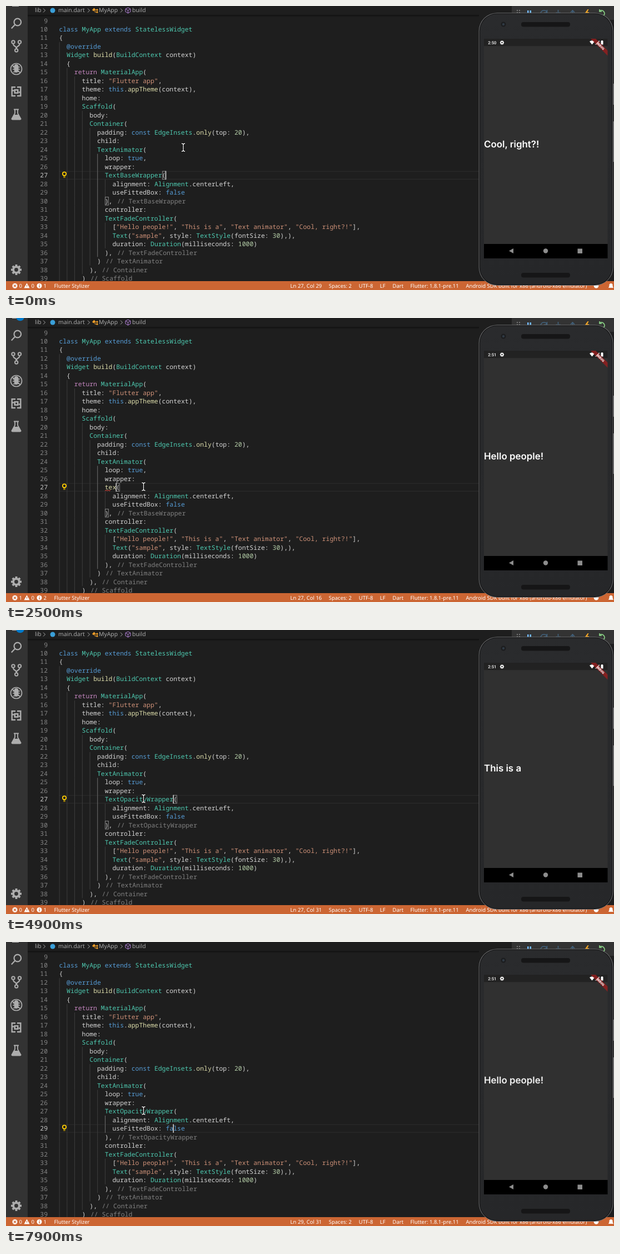
Write an HTML page with a canvas that moves like this. It is 1094 px wide and 512 px high and loops after 8 s.

```html
<!DOCTYPE html>
<html lang="en">
<head>
<meta charset="utf-8">
<title>Editor and emulator</title>
<style>
html, body { margin: 0; width: 100%; height: 100%; overflow: hidden; background: #1e1e1e; }
canvas { display: block; }
</style>
</head>
<body>
<canvas id="stage" width="1094" height="512"></canvas>
<script>
const c = document.getElementById('stage').getContext('2d');
const LOOP = 8000;
const X0 = 95.4, CH = 6.86, LH = 15.483;
const MONO = '11.43px "Noto Sans Mono", monospace';
const BOLD = 'bold ' + MONO;
const CRUMB = '10.4px "Noto Sans", sans-serif';
const STATUS = '9.5px "Noto Sans", sans-serif';
const BLUE = '#569cd6', TEAL = '#4ec9b0', PLAIN = '#d4d4d4', GREY = '#858585', ICON = '#adadad';

const code = `
class MyApp extends StatelessWidget
{
  @override
  Widget build(BuildContext context)
  {
    return MaterialApp(
      title: "Flutter app",
      theme: this.appTheme(context),
      home:
      Scaffold(
        body:
        Container(
          padding: const EdgeInsets.only(top: 20),
          child:
          TextAnimator(
            loop: true,
            wrapper:
            @word(
              alignment: Alignment.centerLeft,
              useFittedBox: false
            ), // @label
            controller:
            TextFadeController(
              ["Hello people!", "This is a", "Text animator", "Cool, right?!"],
              Text("sample", style: TextStyle(fontSize: 30),),
              duration: Duration(milliseconds: 1000)
            ), // TextFadeController
          ) // TextAnimator
        ), // Container
      ) // Scaffold`.split('\n');

// icon kind, then the label with matched letters in brackets
const hints = [
  'c[TextOpa]cityWrapper', 'm[TextOpa]cityWrapper(…)', 'm[Text]Range.c[o]ll[ap]sed(…)',
  'm[Text]InputF[o]rmatFunction(…)', 'c[Text]In[p]utF[o]rm[a]tter', 'm[Text]InputFormatter()',
  'm[Text]Selecti[o]n.coll[ap]sed(…)', 'e[Text]Baseline.ide[o]gr[ap]hic',
  'c[Text]In[p]utC[o]nfigur[a]tion', 'm[Text]InputConfiguration(…)',
  'e[Text]In[p]utActi[o]n.se[a]rch', 'e[Text]In[p]utActi[o]n.continue[A]ction'
];

const midY = n => 42 + (n - 10) * LH;
const colX = n => X0 + n * CH;
const within = (t, a, b) => t >= a && t < b;

// last value whose start time has passed
function at(t, steps) {
  let value = steps[0][1];
  for (const [start, v] of steps) if (t >= start) value = v;
  return value;
}

function text(s, x, y, color, font, align = 'left') {
  c.font = font;
  c.fillStyle = color;
  c.textAlign = align;
  c.fillText(s, x, y);
}

function rect(x, y, w, h, color) {
  c.fillStyle = color;
  c.fillRect(x, y, w, h);
}

function round(x, y, w, h, r, color) {
  c.beginPath();
  c.roundRect(x, y, w, h, r);
  c.fillStyle = color;
  c.fill();
}

function disc(x, y, r, color) {
  c.beginPath();
  c.arc(x, y, r, 0, 7);
  c.fillStyle = color;
  c.fill();
}

function stroke(d, color, width = 1) {
  c.strokeStyle = color;
  c.lineWidth = width;
  c.stroke(new Path2D(d));
}

function fill(d, color) {
  c.fillStyle = color;
  c.fill(new Path2D(d));
}

const ring = (x, y, r) => `M${x - r} ${y}a${r} ${r} 0 1 0 ${2 * r} 0a${r} ${r} 0 1 0 ${-2 * r} 0`;

function gear(x, y, r, color, hole) {
  for (let i = 0; i < 8; i++) {
    c.save();
    c.translate(x, y);
    c.rotate(i * Math.PI / 4);
    rect(-r * .2, -r, r * .4, r * .5, color);
    c.restore();
  }
  disc(x, y, r * .76, color);
  disc(x, y, r * .36, hole);
}

function state(t) {
  const word = at(t, [[0, 'TextBaseWrapper'], [2200, 't'], [2300, 'te'], [2400, 'tex'],
    [3400, 'textopa'], [4000, 'TextOpacityWrapper']]);
  const line = at(t, [[0, 27], [5400, 28], [5600, 29]]);
  const selected = within(t, 1400, 2200);
  let col = line > 27 ? 30 : 12 + word.length;
  if (t < 1300) col = 28;
  else if (t < 1400) col = 22;
  const k = Math.min(1, Math.max(0, (t - 400) / 800)), ease = k * k * (3 - 2 * k);
  return {
    word, line, col, selected,
    label: t < 4500 ? 'TextBaseWrapper' : 'TextOpacityWrapper',
    caret: !(within(t, 300, 800) || within(t, 2000, 2200) || within(t, 4500, 4900) ||
      within(t, 6000, 6500) || within(t, 7000, 7500)),
    pair: line === 27 && !within(t, 1300, 2200) && !within(t, 3700, 3800),
    bulb: !(within(t, 1400, 1500) || within(t, 2200, 2500) || within(t, 3700, 3800) ||
      within(t, 4000, 4600) || within(t, 5400, 5800)),
    popup: within(t, 3400, 4000),
    error: within(t, 2500, 4000),
    unsaved: within(t, 2200, 7100),
    reload: within(t, 7100, 7600),
    clock: t < 2000 ? '2:50' : '2:51',
    message: at(t, [[0, 'Cool, right?!'], [1700, 'Hello people!'], [3700, 'This is a'],
      [5700, 'Text animator'], [7300, 'Hello people!']]),
    alpha: t < 7300 ? 1 : Math.min(1, (t - 7300) / 640),
    mouse: t < 300 ? [319, 255] : [318 - 70.5 * ease, 256 + 48 * ease]
  };
}

function tokenColor(tok, next) {
  if (tok.startsWith('//')) return '#808080';
  if (tok[0] === '"') return '#ce9178';
  if (/^\d/.test(tok)) return '#b5cea8';
  if (tok === 'return') return '#c586c0';
  if (/^(class|extends|this|const|true|false|@override)$/.test(tok)) return BLUE;
  if (/^[A-Z]/.test(tok)) return TEAL;
  if (/^\w/.test(tok) && next === '(') return '#dcdcaa';
  return PLAIN;
}

function codeLine(s, y) {
  for (const m of s.matchAll(/\/\/.*|"[^"]*"|@?\w+|[^\s\w"@]/g)) {
    const end = m.index + m[0].length;
    const gap = m[0].startsWith('//') ? 1.6 : 0; // closing labels sit a little apart
    text(m[0], colX(m.index) + gap, y, tokenColor(m[0], s[end]), MONO);
  }
}

function bracket(col, line) {
  c.strokeStyle = '#888';
  c.lineWidth = 1;
  c.strokeRect(Math.round(colX(col)) + .5, midY(line) - 7.2, CH - 1, LH - 1);
}

function editor(s) {
  const top = midY(s.line) - LH / 2;
  if (!s.selected) {
    rect(X0, top, 756, 1.6, '#282828');
    rect(X0, top + LH - 1.4, 756, 1.6, '#282828');
  } else rect(colX(12), top, 15 * CH, LH, '#264f78');

  const [guide, from, to] = s.line === 27 ? [10, 25, 36] : [12, 28, 29];
  code.forEach((raw, i) => {
    const n = i + 9, y = midY(n);
    const line = raw.replace('@word', s.word).replace('@label', s.label);
    const indent = line.search(/\S|$/);
    for (let k = 0; k < indent; k += 2) {
      const live = k === guide && n >= from && n <= to;
      rect(colX(k) + .3, y - LH / 2, .9, LH + .1, live ? '#777' : '#404040');
    }
    text(n, 75, y + 4, n === s.line ? '#c6c6c6' : GREY, MONO, 'right');
    codeLine(line, y + 4);
  });

  if (s.pair) {
    bracket(12 + s.word.length, 27);
    bracket(12, 30);
  }
  if (s.error) {
    const end = s.word === 'tex' ? 187 : colX(19);
    let d = 'M178 312';
    for (let x = 178, up = 1; x < end; x += 2, up = -up) d += `l2 ${-2 * up}`;
    stroke(d, '#e5483c', 1);
  }
  if (s.bulb) bulb(105, midY(s.line) - 1);
  if (s.caret) rect(colX(s.col) - .8, top, 1.6, LH, '#d0d0d0');

  const shade = c.createLinearGradient(0, 16, 0, 20);
  shade.addColorStop(0, '#0007');
  shade.addColorStop(1, '#0000');
  rect(39, 16, 812, 4, shade);
}

function bulb(x, y) {
  stroke(ring(x, y - 1.6, 3.2), '#fc0', 1.7);
  rect(x - 1.8, y + 1.5, 3.6, 1.6, '#fc0');
  rect(x - 1.8, y + 4, 3.6, 1.4, '#c9a200');
}

function classIcon(x, y) {
  stroke(`M${x - 2} ${y - 1}h5M${x} ${y - 1}v4h3`, '#ee9d28', 1);
  fill(`M${x - 5} ${y - 1}l3.5 -3.5 2.5 2.5 -3.5 3.5z`, '#ee9d28');
  fill(`M${x + 2} ${y - 1}l2 -2 2 2 -2 2zM${x + 2} ${y + 3}l2 -2 2 2 -2 2z`, '#ee9d28');
}

function cubeIcon(x, y) {
  stroke(`M${x} ${y - 5}l4.5 2.3v5l-4.5 2.6 -4.5 -2.6v-5zM${x - 4.5} ${y - 2.7}l4.5 2.5 4.5 -2.5M${x} ${y}v5`, '#b180d7', 1);
}

function enumIcon(x, y) {
  stroke(`M${x - 1} ${y - 4}h6v5h-6zM${x - 5} ${y}h6v4h-6zM${x + 1} ${y - 2}h2M${x - 3} ${y + 2}h2`, '#75beff', 1.1);
}

function popup() {
  rect(227, 112, 350, 186, '#454545');
  rect(228, 113, 348, 184, '#252526');
  rect(228, 113, 348, 14.6, '#062f4a');
  rect(568, 113, 8, 93, '#4f4f50');
  const icon = { c: classIcon, m: cubeIcon, e: enumIcon };
  hints.forEach((hint, i) => {
    const y = 119.8 + i * 15.5;
    icon[hint[0]](237.5, y);
    let x = 247;
    hint.slice(1).split(/[\[\]]/).forEach((part, j) => {
      text(part, x, y + 4, j % 2 ? '#0097fb' : PLAIN, j % 2 ? BOLD : MONO);
      x += part.length * CH;
    });
  });
}

function pointer([x, y]) {
  const d = `M${x - 3} ${y - 7}q3 0 3 2v10q0 2 -3 2M${x + 3} ${y - 7}q-3 0 -3 2v10q0 2 3 2`;
  stroke(d, '#000', 3);
  stroke(d, '#fff', 1.3);
}

function breadcrumbs() {
  const color = '#a9a9a9';
  [['lib', 52], ['main.dart', 94], ['MyApp', 167], ['build', 227]]
    .forEach(([s, x]) => text(s, x, 11.3, color, CRUMB));
  for (const x of [67, 147, 206]) stroke(`M${x} 4.5l3.5 3.5 -3.5 3.5`, color, 1);
  disc(84, 8, 4.5, '#3a9fd8');
  classIcon(160, 8);
  cubeIcon(219.5, 8);
}

function activityBar(s) {
  rect(0, 0, 39, 496, '#333');
  rect(11, 0, 12, 1, ICON);
  if (s.unsaved) disc(25.5, -2, 7.3, '#007acc');
  stroke(ring(20.8, 29, 6.3) + 'M16.3 33.5l-6.5 7', ICON, 2.2);
  stroke(ring(13, 65, 2.7) + ring(24.5, 65, 2.7) + ring(18.7, 80, 2.7) +
    'M13 68q0 3 3 4.5 2.7 1.3 2.7 4.5M24.5 68q0 3 -3 4.5 -2.8 1.3 -2.8 4.5', ICON, 2);
  fill('M14.5 110q0 -5 4 -5t4 5v4q0 6 -4 6t-4 -6z', ICON);
  stroke(ring(18.5, 113.5, 10) + 'M11.5 106.5l14 14M12 110h13M12 114h13M13 119l11 -1', ICON, 1.7);
  stroke('M17 146.2h-6.300v15.800h6.300M20 146.2h6.300v15.800h-6.300M10.700 152.500h4M22.500 155.500h4', ICON, 2.4);
  rect(14.5, 150, 8, 8, ICON);
  rect(17, 152.5, 3, 3, '#333');
  stroke('M14 186.500h9M16 186.500v7l-5.500 9.500q-.5 1.500 1 1.500h14q1.500 0 1 -1.500l-5.500 -9.500v-7', ICON, 1.8);
  fill('M14 196h9l4 8h-17z', ICON);
  gear(18.5, 475.5, 9.5, ICON, '#333');
}

function statusBar(s) {
  rect(0, 496, 1094, 16, '#cc6633');
  const put = (label, x, align) => text(label, x, 508, '#fff', STATUS, align);
  disc(16, 504.5, 4.5, '#fff');
  stroke('M14 502.5l4 4M18 502.5l-4 4', '#cc6633', 1.2);
  fill('M37.5 499.5l5 9h-10z', '#fff');
  rect(37, 503, 1.1, 3, '#cc6633');
  disc(60, 504.5, 4.5, '#fff');
  rect(59.4, 503.5, 1.3, 4, '#cc6633');
  rect(59.4, 501.3, 1.3, 1.3, '#cc6633');
  put(s.error ? '1' : '0', 23.5);
  put('0', 45.5);
  put(s.error ? '2' : '1', 67.5);
  put('Flutter Stylizer', 86.5);
  put(`Ln ${s.line}, Col ${s.col + 1}${s.selected ? ' (15 selected)' : ''}`, 568.3, 'right');
  put('Spaces: 2', 580.7);
  put('UTF-8', 634.7);
  put('LF', 672.7);
  put('Dart', 695.5);
  put('Flutter: 1.8.1-pre.11', 727.5);
  put('Android SDK built for x86 (android-x86 emulator)', 827.5);
  disc(1062, 504.5, 4.3, '#fff');
  fill('M1084 508h9l-1.5 -3v-3q-3 -4 -6 0v3z', '#fff');
}

function debugBar(s) {
  rect(910, 0, 184, 25, '#333');
  for (let i = 0; i < 6; i++) rect(919 + i % 2 * 4, 7 + (i >> 1) * 4, 2, 2, '#777');
  rect(938, 8, 2.5, 9, '#75beff');
  rect(942.5, 8, 2.5, 9, '#75beff');
  const dim = '#41617c';
  stroke('M962 13q1 -5 6 -5t5 4M973.5 7v5h-5M993.5 7v8M990 11.5l3.5 3.5 3.5 -3.5M1019.5 16v-8M1016 11.5l3.5 -3.5 3.5 3.5', dim, 1.6);
  fill('M1046.5 6l-5 7h3.5l-1.5 5 6 -7h-3.5l2.5 -5z', s.reload ? '#735026' : '#f5a623');
  stroke('M1068 9q5 -3 8 1.5t-2 7M1068 6v4h4', s.reload ? '#466a43' : '#89d185', 1.7);
}

function phone(s) {
  rect(1091, 140, 3, 38, '#6a6a6b');
  rect(1091, 208, 3, 73, '#6a6a6b');
  round(850.7, 12.2, 241.8, 491.8, 33, '#6a6b6d');
  round(851.7, 13.2, 239.8, 489.8, 32, '#141415');
  const body = c.createLinearGradient(0, 14, 0, 502);
  body.addColorStop(0, '#2a2b2d');
  body.addColorStop(1, '#262729');
  round(853, 14.5, 237.2, 487.2, 30.5, body);
  round(927, 29, 88, 8.5, 4, '#161617');
  round(927, 481, 88, 8.5, 4, '#161617');
  disc(895, 33, 4.5, '#1c1d1f');
  disc(895, 33, 2.2, '#303a44');

  rect(860, 59, 222.5, 370, '#303030');
  rect(860, 59, 222.5, 13.3, '#222');
  rect(860, 429, 222.5, 26, '#000');
  text(s.clock, 867.3, 68.8, '#fff', '500 7.6px Roboto, sans-serif');
  gear(892.5, 66, 3.7, '#fff', '#222');
  fill('M1050 64q4.5 -3.6 9 0l-4.5 5.5z', '#fff');
  fill('M1060 69.5h7.5v-7.5z', '#fff');
  rect(1070.5, 62.8, 4, 6.7, '#fff');
  rect(1071.5, 62, 2, 1, '#fff');

  c.save();
  c.beginPath();
  c.rect(860, 59, 222.5, 370);
  c.clip();
  c.translate(1082.5, 59);
  c.rotate(Math.PI / 4);
  rect(-24, 15.1, 48, 6.5, 'rgba(160,28,28,.75)');
  text('DEBUG', 0, 20.3, '#fff', '900 5.5px Roboto, sans-serif', 'center');
  c.restore();

  c.globalAlpha = s.alpha;
  text(s.message, 860, 255.4, '#fff', '600 16.9px Inter, sans-serif');
  c.globalAlpha = 1;

  fill('M905 441.5l8 -4.5v9z', '#8d8d8d');
  disc(971, 441.5, 4.2, '#8d8d8d');
  rect(1028.5, 437.5, 8.5, 8.5, '#8d8d8d');
}

function draw(now) {
  const s = state(Math.floor(now % LOOP / 100) * 100);
  c.textRendering = 'geometricPrecision';
  rect(0, 0, 1094, 512, '#1e1e1e');
  editor(s);
  breadcrumbs();
  activityBar(s);
  if (s.popup) popup();
  statusBar(s);
  debugBar(s);
  phone(s);
  pointer(s.mouse);
}

const start = performance.now();
function tick() {
  draw(performance.now() - start);
  requestAnimationFrame(tick);
}
tick();
</script>
</body>
</html>
```
